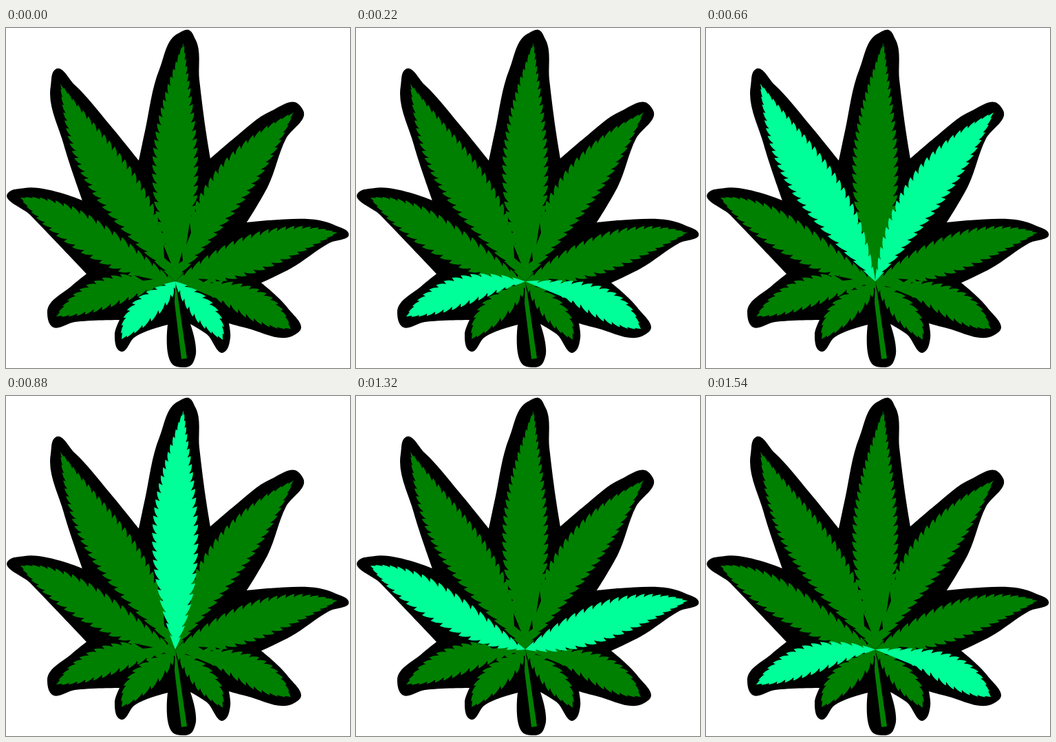
Write an HTML page with a canvas that moves like this. It is 500 by 495 pixels and loops after 1760 ms.

```html
<!DOCTYPE html>
<html lang="en">
<head>
<meta charset="utf-8">
<title>Leaf</title>
<style>
html, body { margin: 0; width: 100%; height: 100%; overflow: hidden; background: #fff; }
canvas { display: block; }
</style>
</head>
<body>
<canvas id="stage" width="500" height="495"></canvas>
<script>
const ctx = document.getElementById('stage').getContext('2d');
const GREEN = '#008000', LIGHT = '#00ff99', STEP = 220, TOP = 4;
const BASE = [246, 369];

const pairs = a => Array.from({ length: a.length / 2 }, (_, i) => a.slice(2 * i, 2 * i + 2));
const dist = (a, b) => Math.hypot(b[0] - a[0], b[1] - a[1]);

// Silhouette: one rounded lobe per row, each ending in a sharp notch
const lobes = [
  [202,150, 223,60, 250,8, 266,3, 275,16, 281,75, 292,160, 297,190],
  [332,160, 385,121, 424,110, 432,120, 407,161, 381,230, 350,283],
  [382,280, 480,288, 498,299, 470,313, 414,350, 371,371],
  [409,407, 427,441, 419,447, 350,437, 324,430],
  [326,451, 317,472, 292,446, 268,431],
  [275,479, 270,490, 248,493, 235,432],
  [186,451, 167,471, 158,446, 165,425],
  [100,428, 66,434, 60,414, 96,375, 117,358],
  [80,319, 35,272, 3,240, 27,233, 111,251],
  [84,170, 65,84, 72,60, 100,83, 150,140, 193,193]
].map(pairs);

// Leaflets from the stem upwards: tip, then two points on each edge
const leaflets = [
  [168,453, 205,429, 236,397, 178,412, 207,385],
  [315,454, 309,417, 283,388, 285,431, 262,403],
  [73,420, 133,410, 190,389, 117,377, 176,360],
  [414,438, 378,389, 320,371, 355,422, 303,391],
  [21,247, 84,307, 167,353, 105,267, 181,318],
  [482,298, 397,293, 317,320, 408,335, 328,364],
  [79,81, 103,190, 154,273, 149,167, 207,250],
  [418,123, 329,185, 274,265, 367,216, 311,291],
  [258,21, 224,134, 217,240, 271,130, 275,245]
].map((row, i) => {
  const [tip, a1, a2, b1, b2] = pairs(row), path = new Path2D();
  addEdge(path, tip, a1, a2, 1);
  addEdge(path, tip, b1, b2, -1);
  return { level: i >> 1, path };
});

// Saw teeth hooked towards the tip, along a cubic through four points
function addEdge(path, tip, p, q, side) {
  const len = dist(tip, p) + dist(p, q) + dist(q, BASE);
  const teeth = Math.round(len / 13), depth = 4 + len / 110;
  const at = (t, off) => {
    const knots = [tip, p, q, BASE], u = 3 * t;
    const w = [
      (1 - u) * (2 - u) * (3 - u) / 6, u * (2 - u) * (3 - u) / 2,
      u * (u - 1) * (3 - u) / 2, u * (u - 1) * (u - 2) / 6
    ];
    const pos = k => knots.reduce((s, v, i) => s + v[k] * w[i], 0);
    if (!off) return [pos(0), pos(1)];
    const a = at(t - 0.01, 0), b = at(t + 0.01, 0), n = off * side / dist(a, b);
    return [pos(0) - (b[1] - a[1]) * n, pos(1) + (b[0] - a[0]) * n];
  };
  path.moveTo(...tip);
  for (let k = 1; k < teeth; k++) {
    const t = (k / teeth) ** 1.15, next = ((k + 1) / teeth) ** 1.15;
    const d = depth * Math.sin(Math.PI * t) ** 0.6;
    path.lineTo(...at(t, -d / 2));
    path.lineTo(...at(t - (next - t) * 0.15, d / 2));
    path.quadraticCurveTo(...at((t + next) / 2, d * 0.35), ...at(next, k < teeth - 1 ? -d / 2 : 0));
  }
  path.lineTo(...BASE);
  // Close along the middle so both halves meet
  path.lineTo((tip[0] + BASE[0]) / 2, (tip[1] + BASE[1]) / 2);
  path.closePath();
}

function addLobe(path, pts) {
  const last = pts.length - 1;
  const dir = i => {
    if (i === 0 || i === last) return [0, 0];
    const [a, b, c] = pts.slice(i - 1, i + 2), l = dist(a, b), m = dist(b, c);
    const v = [0, 1].map(k => (b[k] - a[k]) * m / l + (c[k] - b[k]) * l / m);
    const n = Math.hypot(...v);
    return [v[0] / n, v[1] / n];
  };
  for (let i = 0; i < last; i++) {
    const a = pts[i], b = pts[i + 1], u = dir(i), v = dir(i + 1), h = dist(a, b) / 3;
    path.bezierCurveTo(a[0] + u[0] * h, a[1] + u[1] * h, b[0] - v[0] * h, b[1] - v[1] * h, ...b);
  }
}

function poly(list) {
  const path = new Path2D();
  pairs(list).forEach(p => path.lineTo(...p));
  path.closePath();
  return path;
}

const outline = new Path2D();
let notch = lobes[lobes.length - 1].slice(-1)[0];
outline.moveTo(...notch);
for (const lobe of lobes) {
  addLobe(outline, [notch, ...lobe]);
  notch = lobe[lobe.length - 1];
}
outline.closePath();

// Bridge the two halves of each leaflet
leaflets.forEach(l => { l.joined = true; });

const stem = poly([246,372, 245,400, 255,482, 263,481, 249,386]);
const gaps = [
  [229,316, 240,343, 230,335],
  [267,283, 269,298, 262,316],
  [256,326, 257,339, 251,343],
  [202,330, 214,338, 228,351],
  [186,360, 214,366, 199,368],
  [279,365, 294,366, 287,370]
].map(poly);

function fill(path, color) {
  ctx.fillStyle = color;
  ctx.fill(path);
}

function draw(level) {
  fill(poly([0, 0, 500, 0, 500, 495, 0, 495]), '#fff');
  fill(outline, '#000');
  leaflets.forEach(l => fill(l.path, GREEN));
  gaps.forEach(g => fill(g, '#000'));
  leaflets.filter(l => l.level === level).forEach(l => fill(l.path, LIGHT));
  fill(stem, GREEN);
}

// Light climbs from the stem to the top and back
const start = performance.now();
function frame() {
  const step = Math.floor((performance.now() - start) / STEP) % (2 * TOP);
  draw(TOP - Math.abs(TOP - step));
  requestAnimationFrame(frame);
}
frame();
</script>
</body>
</html>
```
